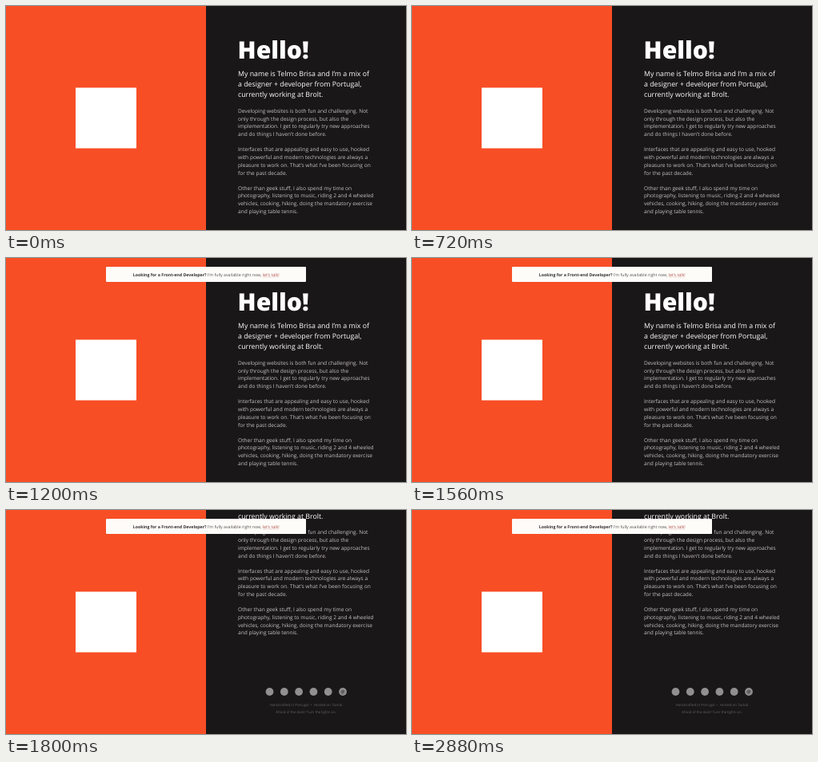
Animation, 500 px wide and 281 px high, one loop 3600 ms. Source, as an HTML page:

```html
<!DOCTYPE html>
<html lang="en">
<head>
<meta charset="utf-8">
<title>Portfolio intro</title>
<style>
  html, body { margin: 0; width: 100%; height: 100%; overflow: hidden; background: #1a1718; }
  svg { display: block; width: 100vw; height: 100vh; }
  text { font-family: "Open Sans", sans-serif; text-rendering: geometricPrecision; white-space: pre; }
  .title { font-size: 30.2px; font-weight: 800; fill: #fff; }
  .intro { font-size: 8.8px; fill: #fff; }
  .body { font-size: 6.6px; fill: #c4c2c2; }
  .small { font-size: 4.4px; fill: #646262; text-anchor: middle; }
  .notice { font-size: 5.25px; fill: #55504f; text-anchor: middle; }
  .notice .lead { font-weight: 700; fill: #353031; }
  .notice .link { fill: #b4534c; }
  .card { fill: #fdfcf9; filter: drop-shadow(0 .5px .6px rgba(0, 0, 0, .3)); }
</style>
</head>
<body>
<svg viewBox="0 0 500 281">
  <rect width="500" height="281" fill="#1a1718"/>
  <rect width="250" height="281" fill="#f74e26"/>
  <rect x="87" y="102.5" width="76" height="76" fill="#fff"/>

  <g id="page">
    <text class="title" x="289.5" y="66">Hello!</text>
    <g id="copy"></g>
    <g id="icons" fill="#918f8f"></g>
    <text x="421" y="333.3" font-size="6" text-anchor="middle" fill="#1a1718">@</text>
    <text class="small" x="375" y="349.4">Handcrafted in Portugal  •  Hosted on Tavlub</text>
    <text class="small" x="375" y="358.9">Afraid of the dark? Turn the lights on.</text>
  </g>

  <g id="banner">
    <rect class="card" x="125" y="11" width="250" height="19" rx="1"/>
    <text class="notice" x="250.2" y="22.5"><tspan class="lead">Looking for a Front-end Developer?</tspan> I’m fully available right now, <tspan class="link">let’s talk!</tspan></text>
    <path d="M320.8 24H341.3" stroke="#b4534c" stroke-width=".4" stroke-dasharray=".6 .6"/>
  </g>
</svg>
<script>
const LOOP = 3600, BANNER_AT = 1200, SCROLL_AT = 1800, SCROLL_BY = 103.4;
const $ = id => document.getElementById(id);

function add(parent, tag, attrs, content = "") {
  const node = document.createElementNS("http://www.w3.org/2000/svg", tag);
  for (const key in attrs) node.setAttribute(key, attrs[key]);
  node.textContent = content;
  parent.append(node);
}

function paragraph(style, y, leading, lines) {
  lines.forEach((line, i) =>
    add($("copy"), "text", { class: style, x: 290, y: y + i * leading }, line));
}

paragraph("intro", 88, 13.2, [
  "My name is Telmo Brisa and I’m a mix of",
  "a designer + developer from Portugal,",
  "currently working at Brolt."
]);

[[
  "Developing websites is both fun and challenging. Not",
  "only through the design process, but also the",
  "implementation. I get to regularly try new approaches",
  "and do things I haven’t done before."
], [
  "Interfaces that are appealing and easy to use, hooked",
  "with powerful and modern technologies are always a",
  "pleasure to work on. That’s what I’ve been focusing on",
  "for the past decade."
], [
  "Other than geek stuff, I also spend my time on",
  "photography, listening to music, riding 2 and 4 wheeled",
  "vehicles, cooking, hiking, doing the mandatory exercise",
  "and playing table tennis."
]].forEach((lines, i) => paragraph("body", 133.7 + i * 48.4, 9.8, lines));

for (let i = 0; i < 6; i++)
  add($("icons"), "circle", { cx: 329.5 + i * 18.3, cy: 331.4, r: 4.9 });

function draw(now) {
  const t = now % LOOP;
  $("banner").setAttribute("visibility", t >= BANNER_AT ? "visible" : "hidden");
  $("page").setAttribute("transform", `translate(0 ${t >= SCROLL_AT ? -SCROLL_BY : 0})`);
}

const start = performance.now();
function tick() {
  draw(performance.now() - start);
  requestAnimationFrame(tick);
}
tick();
</script>
</body>
</html>
```
